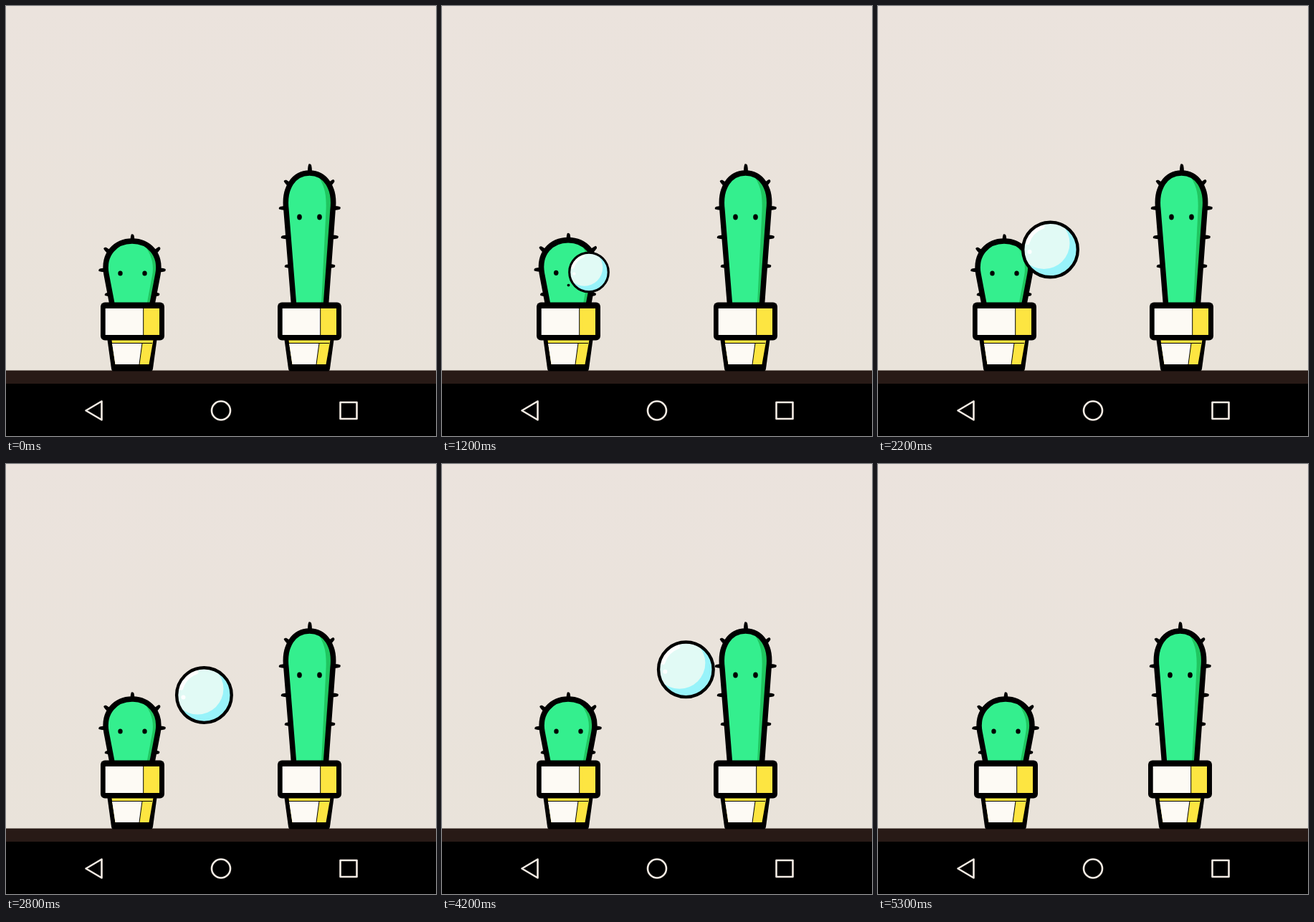
Animation of 600x600 px, one loop 5700 ms. Source, as an HTML page:

```html
<!DOCTYPE html>
<html lang="en">
<head>
<meta charset="utf-8">
<title>Cactus bubble</title>
<style>
  html, body { margin: 0; width: 100%; height: 100%; overflow: hidden; background: #000; }
  svg { display: block; width: 100%; height: 100%; }
  .ink { fill: none; stroke: #000; stroke-width: 7.5; stroke-linejoin: round; }
  .thin { fill: none; stroke: #000; stroke-width: 1; }
  .nav { fill: none; stroke: #f4ece4; stroke-width: 2.6; stroke-linejoin: round; }
</style>
</head>
<body>
<svg viewBox="0 0 600 600">
  <defs>
    <linearGradient id="wall" x2="0" y2="1">
      <stop stop-color="#ebe3dd"/><stop offset="1" stop-color="#e9e3da"/>
    </linearGradient>
    <path id="shortBody" d="M148 416L140 374C135 346 153 328 176 328C199 328 217 346 212 374L204 416"/>
    <path id="tallBody" d="M401.5 416L391 285C387 253 402 233 423.5 233C445 233 460 253 456 285L446.5 416"/>
    <clipPath id="shortClip"><use href="#shortBody"/></clipPath>
    <clipPath id="tallClip"><use href="#tallBody"/></clipPath>
    <clipPath id="ballClip"><circle r="38.5"/></clipPath>
    <path id="spike" d="M-2-3Q5-3 8.500-1.600Q9.500 .8 7 2Q3 3-2 3Z"/>
    <g id="pot">
      <path d="M141 462H211L205 506Q204.500 509.500 202 509.500H150Q147.500 509.500 147 506Z"/>
      <path fill="#fde541" d="M147 463H206L199.500 500H152.500Z"/>
      <path fill="#fdfaf4" d="M148 470.500H190L186 500H152.500Z"/>
      <path class="thin" d="M147 470.500H204M190 470.500L186 500"/>
      <rect x="132" y="413.500" width="89" height="53" rx="6"/>
      <path fill="#fdfaf4" d="M138.700 422H192V459H138.700Z"/>
      <path fill="#fde541" d="M192 422H214V459H192Z"/>
      <path class="thin" d="M191.700 422V459"/>
    </g>
  </defs>

  <rect width="600" height="510" fill="url(#wall)"/>
  <rect y="508.500" width="600" height="18.500" fill="#281a16"/>
  <rect y="527" width="600" height="73"/>
  <path class="nav" d="M111.500 564.500L133.500 551.500V577.500Z"/>
  <circle class="nav" cx="300" cy="564.500" r="13"/>
  <rect class="nav" x="466.500" y="553" width="23" height="23"/>

  <g id="short">
    <g id="puff">
      <g id="shortSpikes"></g>
      <use href="#shortBody" fill="#34ef8e"/>
      <path clip-path="url(#shortClip)" fill="#20c660" d="M190 330C203 345 207 360 204 376L196.500 416H225V330Z"/>
      <use href="#shortBody" class="ink"/>
      <ellipse cx="159.500" cy="373" rx="3.200" ry="3.600"/>
      <ellipse cx="193.500" cy="373" rx="3.200" ry="3.600"/>
      <circle id="mouth" cx="176.500" cy="390" r="1.900"/>
    </g>
    <use href="#pot"/>
  </g>
  <g id="tall">
    <g id="tallSpikes"></g>
    <use href="#tallBody" fill="#34ef8e"/>
    <path clip-path="url(#tallClip)" fill="#20c660" d="M433 234C444 248 447.500 262 446.500 285L440 416H470V234Z"/>
    <use href="#tallBody" class="ink"/>
    <ellipse cx="409.500" cy="294.500" rx="3.300" ry="4.100"/>
    <ellipse cx="437.500" cy="294.500" rx="3.300" ry="4.100"/>
    <use href="#pot" x="247"/>
  </g>

  <g id="bubble">
    <circle r="38.300" fill="#98f3fa"/>
    <g clip-path="url(#ballClip)">
      <circle cx="-9" cy="-9" r="36" fill="#e1faf5"/>
      <path d="M-32-10Q-27-26-11-32" fill="none" stroke="#fff" stroke-width="6" stroke-linecap="round"/>
      <circle cx="-29" cy="3" r="3" fill="#fff"/>
    </g>
    <circle r="38.300" fill="none" stroke="#000" stroke-width="4.400"/>
  </g>
  <g id="shards"></g>
</svg>
<script>
const LOOP = 5700, STEP = 100, LAST = 5300;
const BLOW = 210, RELEASE = 1600, POP = 4250, FADE = 750;
const $ = id => document.getElementById(id);
const place = (id, x, y = 0, s = 1) =>
  $(id).setAttribute('transform', `translate(${x} ${y}) scale(${s})`);
const show = (id, on) => $(id).setAttribute('visibility', on ? 'visible' : 'hidden');

// Each spike: root x, root y, direction in degrees
const drawSpikes = (id, list) => $(id).innerHTML = list.map(([x, y, a]) =>
  `<use href="#spike" transform="translate(${x} ${y}) rotate(${a})"/>`).join('');
drawSpikes('shortSpikes', [[176.5, 327, -90], [143.5, 343, 222], [208.5, 343, -42],
  [138, 368.5, 180], [214, 368.5, 0], [146.5, 402.5, 180], [205.5, 402.5, 0]]);
drawSpikes('tallSpikes', [[424, 229, -90], [395, 249, 222], [451.5, 249, -42],
  [389.5, 282, 180], [458, 282, 0], [392.5, 322.5, 180], [455, 322.5, 0],
  [397.5, 363, 180], [450.5, 363, 0]]);

let seed = 11;
const random = () => (seed = seed * 16807 % 2147483647) / 2147483647;
const shards = Array.from({ length: 76 }, (_, i) => ({
  angle: random() * Math.PI * 2,
  start: i % 5 ? 38 : 34 * random(),
  reach: 10 + 330 * random(),
  size: 1.3 + 1.7 * random(),
  color: i % 5 ? '#000' : '#effcf8'
}));

function bubblePose(t) {
  if (t < RELEASE) {
    const s = Math.max(0, (t - BLOW) / (RELEASE - BLOW));
    return [176.5 + 40 * s, 390 - 26 * s, s];
  }
  const a = (t - RELEASE) / 1000, b = a * (a - 0.6), c = b * (a - 1.8);
  return [216.5 + 40 * a + 11.1 * b - 9.1 * c, 364 - 40 * a + 7.4 * b - 2.8 * c, 1];
}

function drawShards(t) {
  const u = (t - POP) / FADE;
  if (u < 0 || u > 1) return '';
  const spread = 1 - (1 - u) ** 3;
  return shards.map(p => {
    const d = p.start + p.reach * spread;
    const x = 340 + d * Math.cos(p.angle), y = 287 - 50 * spread + d * Math.sin(p.angle);
    return `<circle cx="${x}" cy="${y}" r="${p.size * (1 - u)}" fill="${p.color}"/>`;
  }).join('');
}

function render(t) {
  const blowing = t > BLOW && t <= RELEASE;
  const puff = blowing ? 1 + 0.018 * Math.sin(Math.PI * Math.min(1, (t - BLOW) / 1600)) : 1;
  place('puff', 176 * (1 - puff), 413 * (1 - puff), puff);
  show('mouth', blowing);

  const shake = t > 4400 ? 2 * Math.sin((t - 4400) / 600 * Math.PI) : 0;
  place('short', -shake);
  place('tall', shake);

  show('bubble', t > BLOW && t < POP);
  place('bubble', ...bubblePose(t));
  $('shards').innerHTML = drawShards(t);
}

const begin = performance.now();
function tick() {
  const t = (performance.now() - begin) % LOOP;
  render(Math.min(LAST, Math.floor(t / STEP) * STEP));
  requestAnimationFrame(tick);
}
tick();
</script>
</body>
</html>
```
